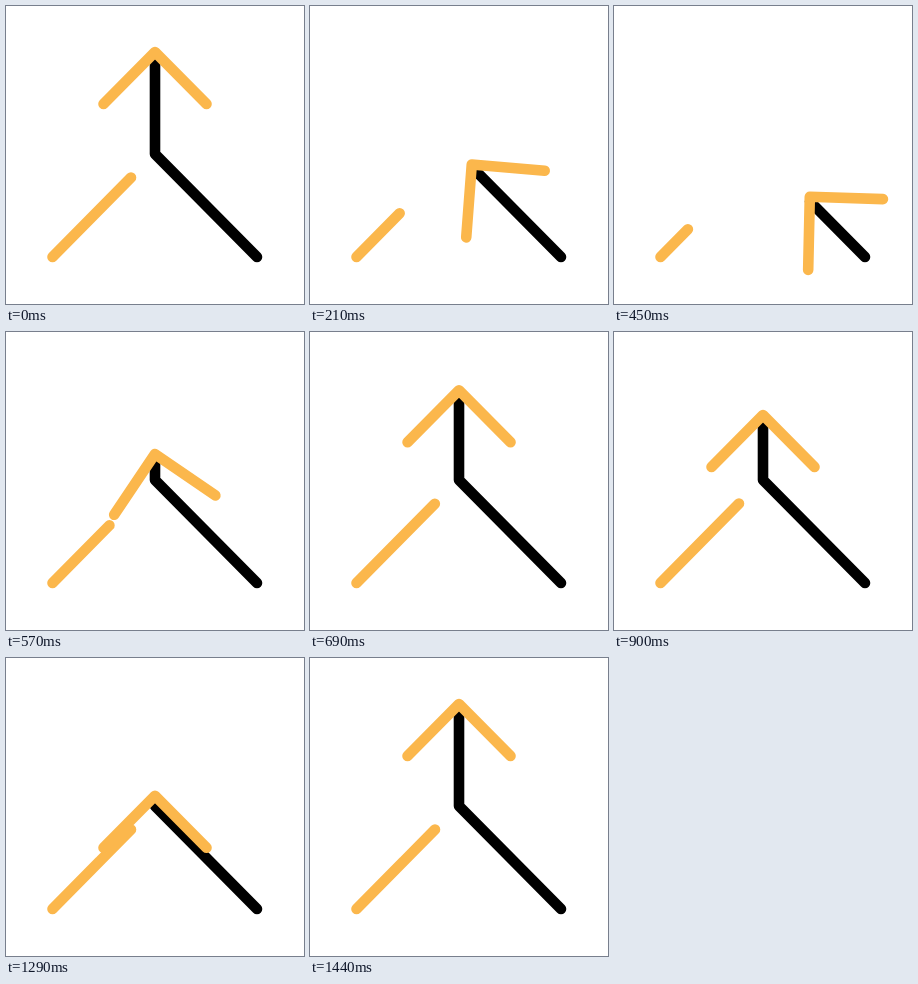
Write an HTML page that moves like this. It is 298x298 px and loops after 1.8 s.

```html
<!DOCTYPE html>
<html>
<head>
<meta charset="utf-8">
<style>
  html, body { margin: 0; width: 100%; height: 100%; overflow: hidden; background: #fff; }
  svg { display: block; width: 100vw; height: 100vh; }
  path { fill: none; stroke: #fbb74c; stroke-width: 10.6; stroke-linecap: round; stroke-linejoin: round; }
  #stem { stroke: #000; }
  #track { stroke: none; }
</style>
</head>
<body>
<svg viewBox="0 0 298 298">
  <path id="track" d="M255 247 L155 152 Q149 146 149 138 V46"/>
  <path id="branch" pathLength="1" d="M46.5 251 L125 171.5"/>
  <path id="stem" d="M251 251 L149 148 V46"/>
  <path id="head" d="M-51.5 52 L0 0 L51.5 52"/>
</svg>
<script>
const LOOP = 1800, STEP = 30, HALF = 360;
const [track, branch, stem, head] =
  ['track', 'branch', 'stem', 'head'].map(id => document.getElementById(id));
const trackLength = track.getTotalLength();
const stemLength = stem.getTotalLength();

const smooth = x => x < 0.5 ? 4 * x ** 3 : 1 - 4 * (1 - x) ** 3;

// Down-and-up pulse between two times
function dip(t, start, end, depth) {
  const p = (t - start) / (end - start);
  return p <= 0 || p >= 1 ? 0 : depth * smooth(1 - Math.abs(2 * p - 1));
}

function draw(t) {
  // Retract to the corner and grow back, mirrored in time
  const x = Math.min(1, Math.abs(t - HALF) / HALF);
  const grown = 1.44 * x - 0.44 * x * x;
  const drop = dip(t, 720, 1080, 37) + dip(t, 1110, 1440, 92);
  const tip = track.getPointAtLength(grown * trackLength - drop);
  const angle = -43.5 / (1 + Math.exp(22 * (grown - 0.64)));
  const visible = Math.max(0, grown * stemLength - drop - 4);

  branch.setAttribute('stroke-dasharray', `${Math.min(1, grown * 1.05)} 3`);
  stem.setAttribute('stroke-dasharray', `${visible} ${2 * stemLength}`);
  head.setAttribute('transform', `translate(${tip.x} ${tip.y}) rotate(${angle})`);
}

function tick() {
  const t = performance.now() % LOOP;
  draw(Math.floor(t / STEP) * STEP);
  requestAnimationFrame(tick);
}
tick();
</script>
</body>
</html>
```
